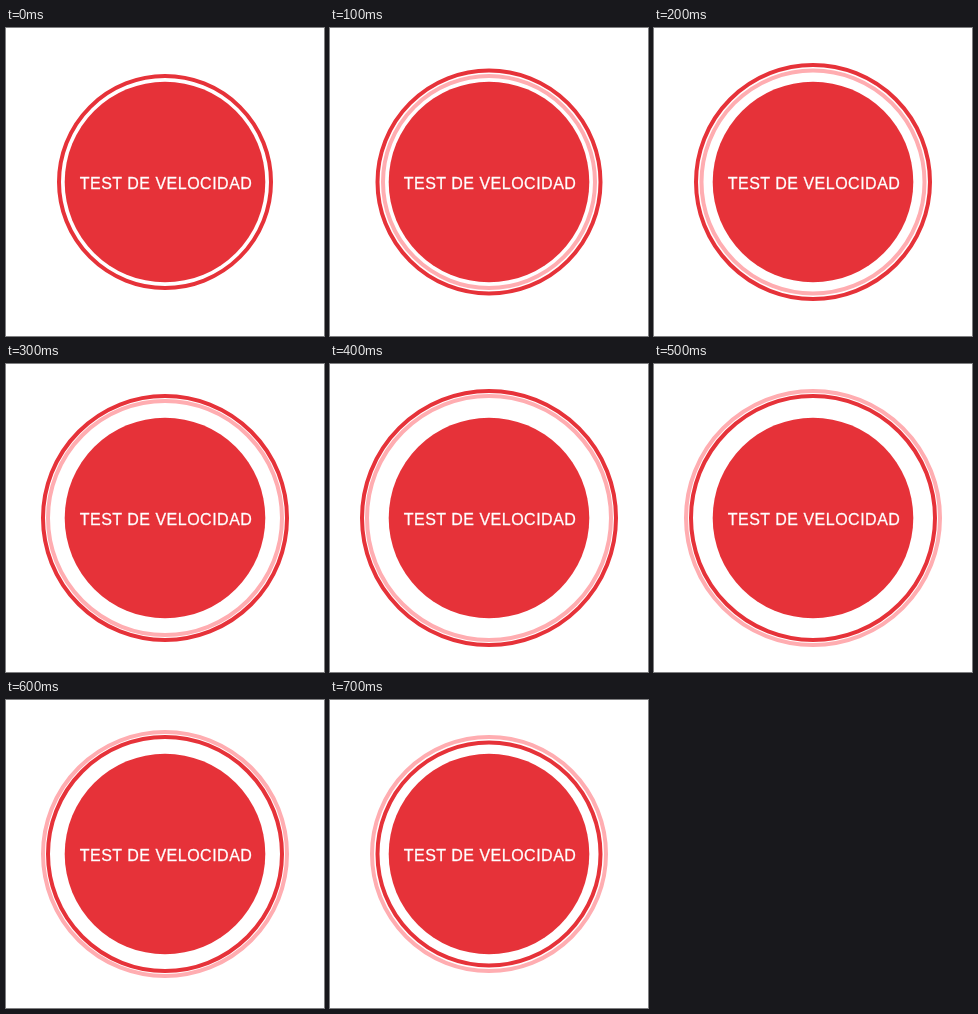
Write an HTML page that moves like this. It is 318 px wide and 308 px high and loops after 0.8 s.

```html
<!DOCTYPE html>
<html lang="es">
<head>
<meta charset="utf-8">
<title>Test de velocidad</title>
<style>
  html, body { margin: 0; width: 100%; height: 100%; overflow: hidden; background: #fff; }
  svg { display: block; }
  circle { fill: none; stroke-width: 4; }
  #echo { stroke: #ffadb1; }
  #ring { stroke: #e63239; }
  #disc { fill: #e63239; }
  text { font: 16px "Liberation Sans", Arial, sans-serif; letter-spacing: .5px; fill: #fff; stroke: #fff; stroke-width: .3px; }
</style>
</head>
<body>
<svg width="318" height="308" viewBox="0 0 318 308">
  <g transform="translate(159 154)">
    <circle id="echo"/>
    <circle id="ring"/>
    <circle id="disc" r="100.3"/>
  </g>
  <text x="73.7" y="160.5">TEST DE VELOCIDAD</text>
</svg>
<script>
  const STEP = 100, STEPS = 8;
  const OUTER = [108, 113.5, 119, 124, 129];
  const echo = document.getElementById("echo");
  const ring = document.getElementById("ring");

  // Grows for four steps, then shrinks back.
  const radius = i => OUTER[4 - Math.abs(4 - i)] - 2;

  function draw(now) {
    const i = Math.floor(now / STEP) % STEPS;
    ring.setAttribute("r", radius(i));
    // The pale echo trails one step behind and is absent at rest.
    echo.setAttribute("r", i ? radius(i - 1) : 0);
    echo.setAttribute("visibility", i ? "visible" : "hidden");
    requestAnimationFrame(draw);
  }
  draw(performance.now());
</script>
</body>
</html>
```
